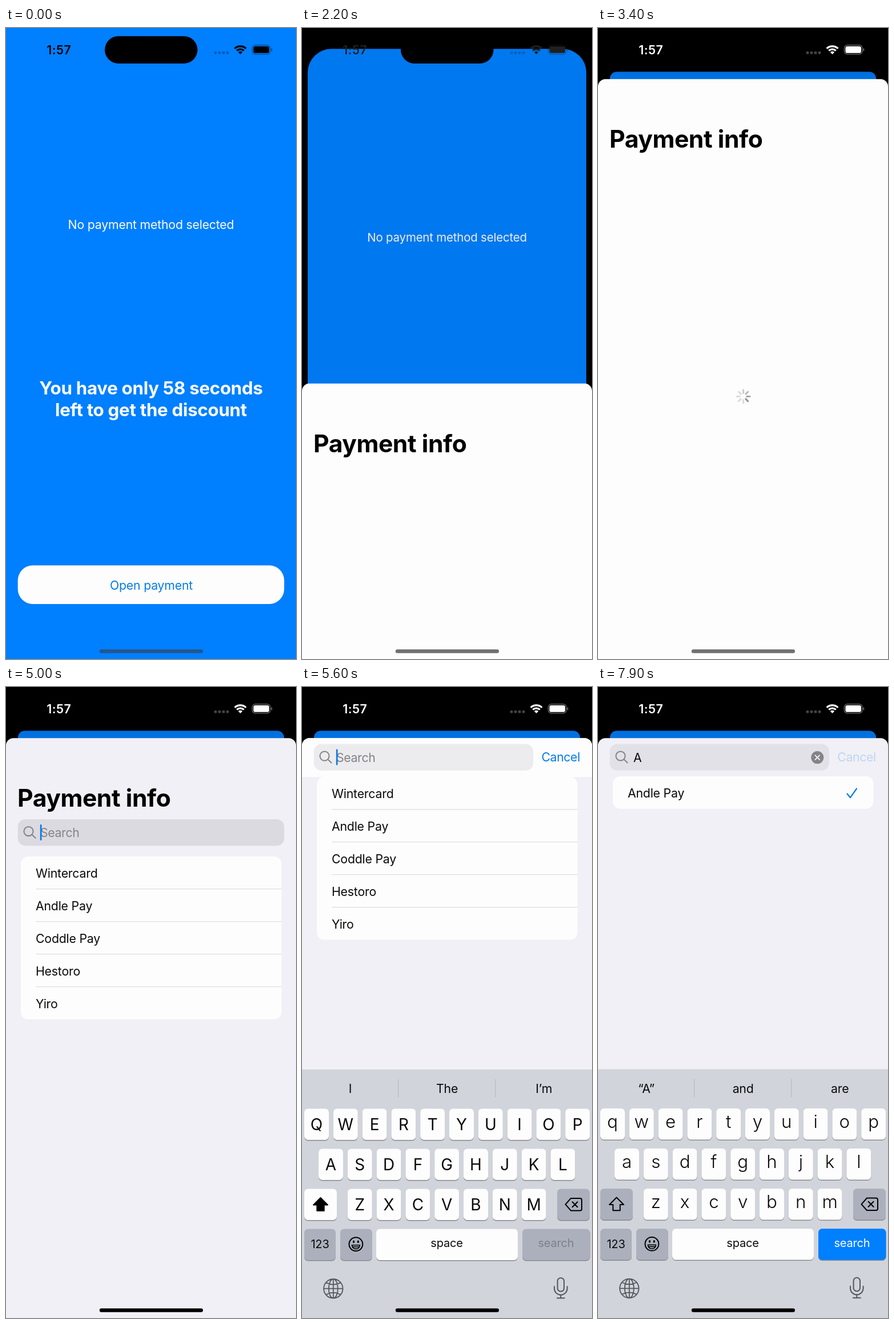
An HTML page with a canvas for the animation above (8000 ms loop, 508 by 1102 pixels).

```html
<!DOCTYPE html>
<html lang="en">
<head>
<meta charset="utf-8">
<title>Payment sheet</title>
<style>
html, body { margin: 0; width: 100%; height: 100%; overflow: hidden; background: #000; }
canvas { display: block; width: 508px; height: 1102px; }
</style>
</head>
<body>
<canvas id="stage"></canvas>
<script>
const W = 508, H = 1102, LOOP = 8000, STEP = 100;
const BLUE = '#007fff', TINT = '#077ce6', WHITE = '#fdfdfd', PAGE = '#f1f0f6', INK = '#0a0a0a';
const GRAY = '#838388', KEY_GRAY = '#abb0bc', PT = 1.2926 * 0.97;
const SHEET_TOP = 89.25, CARD_TOP = 76.3, INSET = 20.7;
const METHODS = ['Wintercard', 'Andle Pay', 'Coddle Pay', 'Hestoro', 'Yiro'];
const MATCH = 1, ROW = 56.9;

const canvas = document.getElementById('stage');
const dpr = window.devicePixelRatio || 1;
canvas.width = W * dpr;
canvas.height = H * dpr;
const c = canvas.getContext('2d');

const clamp = v => Math.min(1, Math.max(0, v));
const lerp = (a, b, p) => a + (b - a) * p;
const ramp = (t, from, to) => clamp((t - from) / (to - from));
const gray = v => `rgb(${v},${v},${v})`;

// Critically damped spring from 0 to 1.
function spring(t, start, speed) {
  const d = Math.max(0, t - start) / 1000 * speed;
  return 1 - (1 + d) * Math.exp(-d);
}

function box(x, y, w, h, r, color) {
  c.beginPath();
  c.roundRect(x, y, w, h, r);
  c.fillStyle = color;
  c.fill();
}

function text(str, x, y, pt, color, o = {}) {
  const { weight = 400, align = 'left', track = -0.01 } = o;
  const size = pt * PT;
  c.font = `${weight} ${size}px Inter, sans-serif`;
  c.letterSpacing = `${track * size}px`;
  c.textAlign = align;
  c.fillStyle = color;
  c.fillText(str, x, y);
}

function stroke(d, color, width) {
  c.strokeStyle = color;
  c.lineWidth = width;
  c.lineCap = c.lineJoin = 'round';
  c.stroke(new Path2D(d));
}

function fill(d, color) {
  c.fillStyle = color;
  c.fill(new Path2D(d));
}

function faded(alpha, draw) {
  if (alpha <= 0) return;
  c.save();
  c.globalAlpha *= alpha;
  draw();
  c.restore();
}

function statusBar(color) {
  text('1:57', 92.7, 46, 17, color, { weight: 600, align: 'center', track: 0.022 });
  faded(0.27, () => {
    for (let i = 0; i < 4; i++) box(364.7 + i * 7, 41, 4.6, 4.6, 1.2, color);
  });
  const arc = (r, width) => {
    c.beginPath();
    c.arc(410.5, 46, r, -Math.PI * 0.745, -Math.PI * 0.255);
    c.lineWidth = width;
    c.lineCap = 'butt';
    c.strokeStyle = color;
    c.stroke();
  };
  arc(14.2, 3.2);
  arc(8.9, 3.1);
  arc(2.6, 5.2);
  faded(0.42, () => {
    c.beginPath();
    c.roundRect(431.4, 30, 31.6, 15.8, 5.4);
    c.lineWidth = 1.3;
    c.strokeStyle = color;
    c.stroke();
    box(464.4, 35.4, 1.8, 5, 1, color);
  });
  box(433.4, 32, 27.6, 11.8, 3.4, color);
}

function homePage(t) {
  c.fillStyle = BLUE;
  c.fillRect(0, 0, W, H);
  const mid = { align: 'center' };
  text('No payment method selected', 254, 350.5, 17, WHITE, mid);
  const left = 58 - Math.ceil(Math.max(0, t - 99) / 1000);
  const bold = { weight: 700, align: 'center' };
  text(`You have only ${left} seconds`, 254, 639.5, 25, WHITE, bold);
  text('left to get the discount', 254, 678, 25, WHITE, bold);
  const pressed = t >= 2000;
  faded(pressed ? 0.24 : 1, () => {
    box(INSET, 938.6, W - 2 * INSET, 67.3, 26, WHITE);
    faded(pressed ? 0.65 : 1, () => text('Open payment', 254.5, 980.5, 17, TINT, mid));
  });
}

function backdrop(t, p) {
  c.save();
  if (p > 0) {
    const s = lerp(1, 1 - 2 * INSET / W, p);
    c.translate((W - W * s) / 2, CARD_TOP * p);
    c.scale(s, s);
    c.beginPath();
    c.roundRect(0, 0, W, H, lerp(71, 14, p));
    c.clip();
  }
  homePage(t);
  c.fillStyle = `rgba(0,0,0,${0.12 * p})`;
  c.fillRect(0, 0, W, H);
  c.restore();
}

function spinner(t) {
  const shades = [148, 168, 188, 206];
  const head = Math.round((t - 3400) / 100) + 1;
  for (let k = 0; k < 8; k++) {
    const a = (head - k) * Math.PI / 4, x = Math.cos(a), y = Math.sin(a);
    c.beginPath();
    c.moveTo(254.5 + x * 6.2, 643.5 + y * 6.2);
    c.lineTo(254.5 + x * 11.4, 643.5 + y * 11.4);
    c.lineCap = 'round';
    c.lineWidth = 3.2;
    c.strokeStyle = gray(shades[k] || 220);
    c.stroke();
  }
}

function methodList(t, focus, filter) {
  const top = lerp(296, 157, focus) - filter;
  const height = lerp(ROW * 5, ROW, filter);
  c.save();
  c.beginPath();
  c.roundRect(26, top, 456.6, height, 13);
  c.clip();
  c.fillStyle = WHITE;
  c.fillRect(26, top, 457, height);
  if (t >= 6900) {
    faded(1 - ramp(t, 7000, 7400), () => {
      c.fillStyle = '#d1d1d6';
      c.fillRect(26, top, 457, height);
    });
  }
  METHODS.forEach((name, i) => {
    const picked = i === MATCH;
    const y = top + ROW * (picked ? lerp(i, 0, filter) : i);
    faded(picked ? 1 : 1 - 1.6 * filter, () => text(name, 52, y + 37, 17, INK));
    if (i) faded(1 - 1.6 * filter, () => {
      c.fillStyle = '#dddde0';
      c.fillRect(52, top + ROW * i - 0.8, 431, 1.2);
    });
  });
  if (t >= 7000) stroke('M436.5 186.5L442 193.2L453 177.5', TINT, 2.2);
  c.restore();
}

function searchBar(t, focus) {
  const y = lerp(231, 99.5, focus), right = lerp(W - INSET, 405, focus);
  const typed = t >= 6200;
  const pressed = t >= 4900 && t < 5100;
  box(INSET, y, right - INSET, 46.3, 13, `rgba(118,118,128,${pressed ? 0.18 : 0.12})`);
  c.save();
  c.translate(0, y);
  stroke('M47.6 21a8.1 8.1 0 1 1-16.2 0a8.1 8.1 0 1 1 16.2 0M45.4 26.8L51.6 32.8', GRAY, 2);
  if (typed) {
    text('A', 62, 31.5, 17, INK);
    box(right - 31.7, 12.6, 22, 22, 11, GRAY);
    const x = right - 20.7;
    stroke(`M${x - 3.8} 19.8l7.6 7.6m0 -7.6l-7.6 7.6`, '#f4f4f6', 1.9);
  } else {
    text('Search', 60, 31, 17, GRAY, { track: -0.018 });
  }
  const caretOn = typed ? (t - 6200) % 1000 < 500 : t >= 4900 && !(t >= 5800 && t < 6100);
  if (caretOn) box(typed ? 77 : 59.8, 9, 2.7, 28, 1.3, TINT);
  c.restore();
  faded(focus * (t >= 7700 ? 0.22 : 1), () =>
    text('Cancel', 419.3 + 88 * (1 - focus), y + 30.7, 17, TINT, { track: -0.018 }));
}

function searchPage(t) {
  const focus = spring(t, 5080, 18), filter = spring(t, 6180, 18);
  c.fillStyle = PAGE;
  c.fillRect(0, 89, W, H);
  methodList(t, focus, filter);
  faded(focus * (1 - filter), () => {
    c.fillStyle = WHITE;
    c.fillRect(0, 89, W, lerp(277, 157, focus) - 89);
  });
  faded(1 - 2.2 * focus, () => title(209 - 131.5 * focus));
  searchBar(t, focus);
  if (focus > 0) keyboard(t, (1 - focus) * 435);
}

function title(y) {
  text('Payment info', 20, y, 34, '#000', { weight: 700 });
}

function key(x, y, w, color) {
  box(x, y + 1.4, w, 54.6, 6.5, '#898b90');
  box(x, y, w, 54.6, 6.5, color);
}

function keyboard(t, dy) {
  const lower = t >= 6200, mid = { align: 'center' };
  c.save();
  c.translate(0, dy);
  c.fillStyle = '#d1d4db';
  c.fillRect(0, 667.5, W, H);

  const hints = lower ? ['“A”', 'and', 'are'] : ['I', 'The', 'I’m'];
  hints.forEach((word, i) => text(word, 84.5 + 169.6 * i, 708.5, 17, INK, mid));
  c.fillStyle = '#b8bbc2';
  c.fillRect(168, 684.5, 1.2, 32);
  c.fillRect(338, 684.5, 1.2, 32);

  const rows = [['QWERTYUIOP', 4], ['ASDFGHJKL', 29], ['ZXCVBNM', 79.8]];
  rows.forEach(([letters, x0], r) => {
    const y = 736 + 70 * r;
    [...letters].forEach((ch, i) => {
      const x = x0 + 50.8 * i;
      key(x, y, 43, WHITE);
      if (lower) text(ch.toLowerCase(), x + 21.5, y + 33.5, 25, INK, { weight: 350, align: 'center', track: 0 });
      else text(ch, x + 21.5, y + 38, 22.3, INK, { align: 'center', track: 0 });
    });
  });

  key(4, 876, 57, lower ? KEY_GRAY : WHITE);
  const arrow = 'M32.5 891.5L45 904H38.7V914.3H26.3V904H20Z';
  if (!lower) fill(arrow, '#000');
  stroke(arrow, '#000', 2);

  key(447, 876, 57, KEY_GRAY);
  stroke('M471 892.5H487Q490 892.5 490 895.5V911Q490 914 487 914H471L461.5 903.3ZM473.6 898.8l9 9m0 -9l-9 9', '#000', 2);

  key(4, 946, 55, KEY_GRAY);
  text('123', 31.5, 980, 16, INK, mid);

  key(67, 946, 56, KEY_GRAY);
  stroke('M106.3 972.7a11.9 11.9 0 1 1-23.8 0a11.9 11.9 0 1 1 23.8 0', '#000', 2);
  stroke('M87.4 974.3H101.4Q100.5 981 94.4 981Q88.3 981 87.4 974.3ZM89 977.4H99.8', '#000', 1.6);
  box(89, 966, 3, 4.6, 1.5, '#000');
  box(96.8, 966, 3, 4.6, 1.5, '#000');

  key(130, 946, 248, WHITE);
  text('space', 253.5, 978, 16, INK, mid);
  key(386, 946, 118.5, lower ? BLUE : KEY_GRAY);
  text('search', 445, 978, 16, lower ? WHITE : '#7d8088', mid);

  const icon = '#55575c';
  stroke('M71.5 1050.3a16.7 16.7 0 1 1-33.4 0a16.7 16.7 0 1 1 33.4 0M62.8 1050.3a8 16.7 0 1 1-16 0a8 16.7 0 1 1 16 0'
    + 'M54.8 1033.6V1067M38.1 1050.3H71.5M42.3 1040Q54.8 1046.5 67.3 1040M42.3 1060.6Q54.8 1054 67.3 1060.6', icon, 1.8);
  stroke('M447.6 1037.2a5.7 5.7 0 0 1 11.4 0V1049.5a5.7 5.7 0 0 1-11.4 0Z'
    + 'M442 1046.5V1050a11.3 11.3 0 0 0 22.6 0V1046.5M453.3 1061.5V1066.8M446.8 1066.8H459.8', icon, 2);

  if (t === 6100) keyBubble();
  c.restore();
}

function keyBubble() {
  c.save();
  c.shadowColor = 'rgba(0,0,0,.3)';
  c.shadowBlur = 5;
  fill('M29 730H72Q84 730 84 742V783C84 798 72 798 72 812V855Q72 861 66 861H35Q29 861 29 855V812'
    + 'C29 798 17 798 17 783V742Q17 730 29 730Z', WHITE);
  c.restore();
  text('A', 50.5, 782, 34, INK, { align: 'center', track: 0 });
}

function sheet(t, p) {
  c.save();
  c.translate(0, lerp(H - SHEET_TOP, 0, p));
  c.beginPath();
  c.roundRect(0, SHEET_TOP, W, H, 13);
  c.clip();
  if (t < 3600) {
    c.fillStyle = WHITE;
    c.fillRect(0, 89, W, H);
    title(209);
    if (t >= 2800) spinner(t);
  } else {
    searchPage(t);
  }
  c.restore();
}

function draw(t) {
  c.setTransform(dpr, 0, 0, dpr, 0, 0);
  c.fillStyle = '#000';
  c.fillRect(0, 0, W, H);
  const p = spring(t, 2120, 20);
  backdrop(t, p);
  box(173, 14.3, 162.5, 47.8, 23.9, '#000');
  statusBar(gray(Math.round(255 * ramp(t, 2150, 2550))));
  if (p > 0) sheet(t, p);
  const bar = p > 0 ? gray(Math.round(112 * (1 - ramp(t, 3500, 4200)))) : '#25568c';
  box(163.8, 1085.2, 181.2, 6.5, 3.25, bar);
}

// The picture advances in tenths of a second.
let shown = -1;
function tick() {
  const t = Math.floor(performance.now() % LOOP / STEP) * STEP;
  if (t !== shown) draw(shown = t);
  requestAnimationFrame(tick);
}
tick();
</script>
</body>
</html>
```
